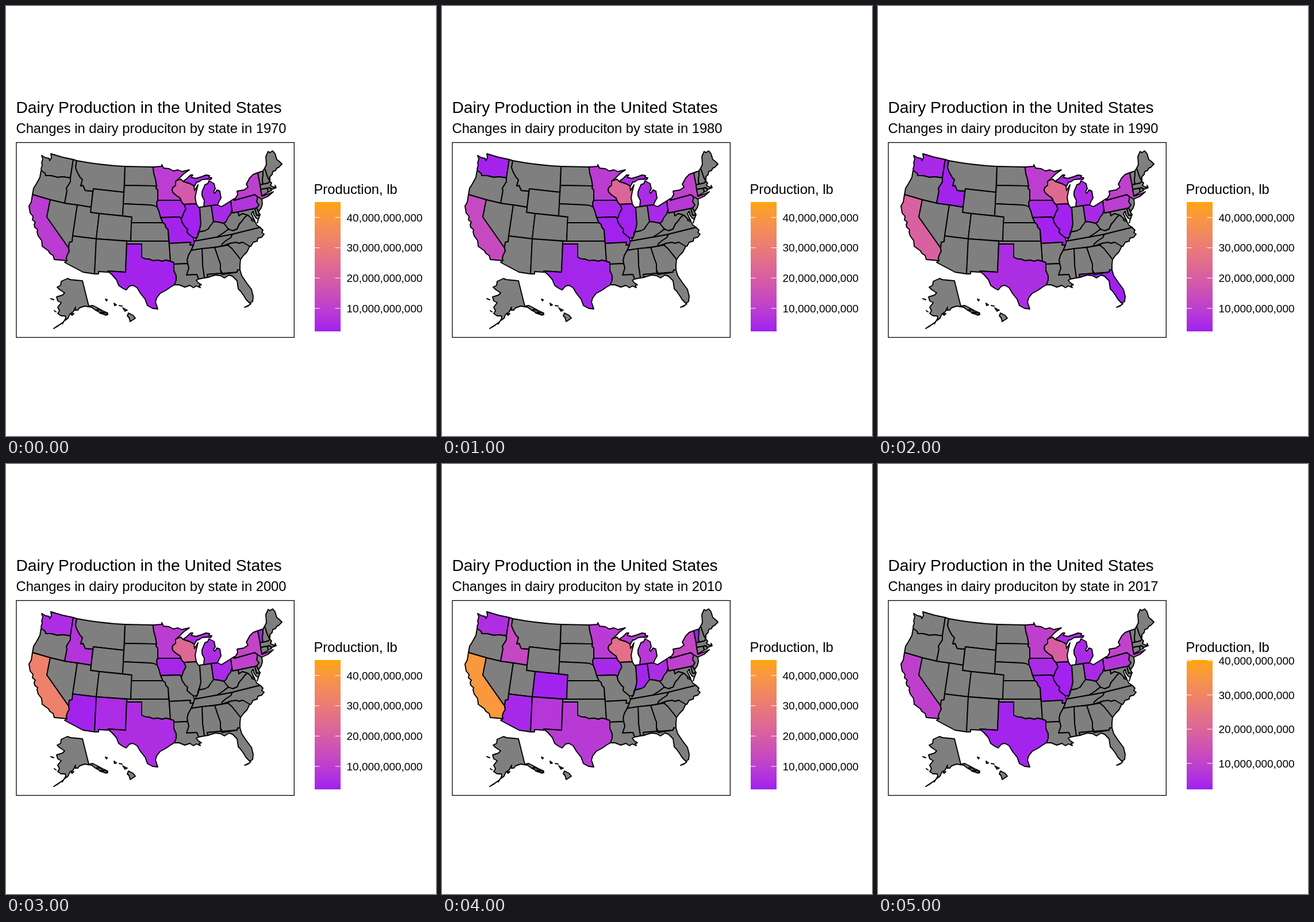
An HTML page for the animation above (6000 ms loop, 748 by 748 pixels).

```html
<!DOCTYPE html>
<html lang="en">
<head>
<meta charset="utf-8">
<title>Dairy production map</title>
<style>
  html, body { margin: 0; width: 100%; height: 100%; overflow: hidden; background: #fff; }
  svg { position: absolute; left: 0; top: 0; width: 748px; height: 748px; }
  text { font: 23.75px "Liberation Sans", Arial, sans-serif; }
  #title { font-size: 28.2px; }
  #scale text { font-size: 19px; }
  #scale path { stroke: #fff; stroke-width: 1; }
  #map path { fill: #7f7f7f; stroke: #000; stroke-width: 1.9; stroke-linejoin: round; }
  #bar {
    position: absolute; left: 536.5px; top: 341px; width: 45px; height: 225px;
    background: linear-gradient(in lab to top, #a020f0, #ffa500);
  }
</style>
</head>
<body>
<div id="bar"></div>
<svg viewBox="0 0 748 748">
  <text id="title" x="17.5" y="186">Dairy Production in the United States</text>
  <text id="subtitle" x="17.5" y="221"></text>
  <text x="535.5" y="327">Production, lb</text>
  <g id="scale"></g>
  <rect x="18" y="237.5" width="483.3" height="339" fill="none" stroke="#000" stroke-width="1.3"/>
  <g id="map">
    <path id="WA" d="M62 260L64 266 62 273 63 277 61 283 63 289 68 291 69 295 78 295 90 298 99 297 112 299 117 267 98 263 78 257 79 264 76 269 75 265 69 264Z"/>
    <path id="OR" d="M61 286L59 298 53 309 48 317 46 328 77 337 102 343 106 322 105 317 112 306 112 299 99 297 90 298 78 295 69 295 68 291Z"/>
    <path id="CA" d="M46 328L77 337 71 367 109 421 110 427 107 432 105 438 106 443 84 441 82 434 76 430 74 426 63 418 62 408 56 400 54 393 55 389 50 385 49 380 51 376 46 372 47 366 42 360 40 348 44 341Z"/>
    <path id="NV" d="M77 337L102 343 124 346 116 400 115 410 110 411 109 421 71 367Z"/>
    <path id="ID" d="M117 267L123 269 121 281 124 289 129 298 133 302 130 313 134 312 138 321 151 322 148 350 124 346 102 343 106 322 105 317 112 306 112 299Z"/>
    <path id="MT" d="M123 269Q165 277 207 279L205 324 152 318 151 322 138 321 134 312 130 313 133 302 129 298 124 289 121 281Z"/>
    <path id="WY" d="M152 318L205 324 203 365 162 361 147 359Z"/>
    <path id="UT" d="M124 346L148 350 147 359 162 361 157 405 116 400Z"/>
    <path id="CO" d="M162 361L219 367 217 409 157 405Z"/>
    <path id="AZ" d="M116 400L157 405 154 466 134 463 102 446 106 443 105 438 107 432 110 427 109 421 110 411 115 410Z"/>
    <path id="NM" d="M157 405L210 409 208 463 177 461 178 463 161 462 161 466 154 466Z"/>
    <path id="ND" d="M207 279L256 280 257 291 260 301 262 313 206 312Z"/>
    <path id="SD" d="M206 312L262 313 261 317 264 320 264 338 262 342 263 350 257 347 248 346 204 344Z"/>
    <path id="NE" d="M204 344L248 346 257 347 263 350 266 357 269 368 273 377 218 377 219 367 203 365Z"/>
    <path id="KS" d="M218 377L273 377 277 380 278 385 282 389 283 409 217 409Z"/>
    <path id="OK" d="M210 409L283 409 284 415 286 444 278 442 272 444 264 442 256 443 248 440 243 440 236 437 236 414 210 414Z"/>
    <path id="TX" d="M210 414L236 414 236 437 243 440 248 440 256 443 264 442 272 444 278 442 286 444 292 446 292 460 296 469 296 477 293 485 286 489 279 494 268 500 262 508 260 515 264 527 255 526 246 521 242 510 234 500 228 490 221 486 215 487 209 494 203 491 196 486 192 476 185 468 177 461 208 463Z"/>
    <path id="MN" d="M256 280L271 279 271 276 274 282 284 283 291 287 299 285 306 288 319 285 309 292 301 300 295 305 295 312 290 316 289 321 291 325 297 330 303 334 304 338 264 338 264 320 261 317 262 313 260 301 257 291Z"/>
    <path id="WI" d="M295 305L304 301 308 305 320 309 327 313 328 321 334 311 331 323 329 333 331 344 310 345 306 342 303 334 297 330 291 325 289 321 290 316 295 312Z"/>
    <path id="IA" d="M264 338L304 338 306 342 310 346 313 353 309 360 307 366 305 370 302 367 269 368 266 357 263 350 262 342Z"/>
    <path id="MO" d="M269 368L302 367 305 370 306 376 312 385 316 388 315 394 322 400 326 403 327 408 330 410 325 416 320 416 321 411 284 413 282 389 278 385 277 380 273 377Z"/>
    <path id="IL" d="M310 345L331 344 334 349 337 352 339 379 337 388 334 395 333 402 328 404 326 403 322 400 315 394 316 388 312 385 306 376 305 370 307 366 309 360 313 353Z"/>
    <path id="IN" d="M337 350L357 347 361 375 360 379 355 383 352 388 346 391 336 393 339 379Z"/>
    <path id="MI" d="M344 349L357 347 368 346 371 339 374 334 372 322 367 320 363 326 361 323 364 318 362 309 353 304 351 309 346 311 341 323 341 330 345 338ZM308 305L315 300 321 294 325 294 322 298 330 300 340 297 348 294 354 295 353 298 358 299 356 302 351 301 341 302 335 306 332 306 328 313 320 309Z"/>
    <path id="OH" d="M357 347L368 346 375 349 383 344 391 339 393 354 391 362 386 368 383 375 379 378 370 376 361 375Z"/>
    <path id="KY" d="M361 375L370 376 379 378 383 383 387 388 378 395 367 402 328 409 333 402 336 393 346 391 352 388 355 383Z"/>
    <path id="TN" d="M328 409L367 402 394 397 391 403 383 408 376 414 375 418 322 425 326 416Z"/>
    <path id="WV" d="M379 378L383 375 386 368 391 362 393 354 394 360 404 358 405 365 411 361 421 363 415 368 410 375 406 379 402 388 394 391 387 388 383 383Z"/>
    <path id="VA" d="M387 388L394 391 402 388 406 379 410 375 415 368 421 363 428 369 427 373 434 376 436 381 442 385 394 397 367 402 378 395ZM439 370L437 378"/>
    <path id="MD" d="M404 358L433 352 436 364 442 363 439 371 435 369 431 363 430 357 427 361 430 368 433 374 427 370 421 364 411 361 405 365Z"/>
    <path id="DE" d="M433 352L436 351 439 358 442 363 436 364Z"/>
    <path id="PA" d="M391 339L397 335 397 338 433 328 438 333 436 340 440 346 436 351 433 352 394 360 393 354Z"/>
    <path id="NJ" d="M438 332L445 335 446 344 444 351 440 357 436 352 440 346 436 340Z"/>
    <path id="NY" d="M397 338L403 328 402 322 414 320 421 315 418 310 424 299 430 293 438 290 440 301 442 311 443 319 445 331 456 327 465 323 456 331 445 336 438 332 433 328Z"/>
    <path id="VT" d="M438 290L447 287 447 294 446 303 447 310 442 311 440 301Z"/>
    <path id="NH" d="M447 287L450 282 455 297 459 305 456 308 447 310 446 303 447 294Z"/>
    <path id="ME" d="M450 282L453 276 452 262 456 253 459 255 464 252 468 257 471 267 475 270 480 275 474 281 471 282 469 286 464 288 463 293 459 297 459 305 455 297Z"/>
    <path id="MA" d="M442 311L456 308 459 305 462 308 460 312 465 315 469 315 468 312 470 316 462 319 459 316 443 319Z"/>
    <path id="CT" d="M443 319L455 317 456 324 445 330Z"/>
    <path id="RI" d="M455 317L459 316 462 321 456 324Z"/>
    <path id="NC" d="M394 397L442 385 447 390 445 394 449 397 445 402 438 404 437 409 430 411 426 418 421 418 412 411 404 413 401 411 389 413 375 418 376 414 383 408 391 403Z"/>
    <path id="SC" d="M386 416L389 413 401 411 404 413 412 411 424 418 419 428 413 434 408 441 401 432 393 422Z"/>
    <path id="GA" d="M363 420L386 416 393 422 401 432 408 441 407 450 407 459 403 459 402 463 376 465 373 459 373 449 370 441Z"/>
    <path id="AL" d="M341 422L363 420 370 441 373 449 373 459 374 465 350 467 352 472 345 473 342 452Z"/>
    <path id="MS" d="M322 425L341 422 342 452 345 473 335 475 332 467 314 468 318 456 316 448 315 442 317 434Z"/>
    <path id="AR" d="M284 413L321 411 320 416 326 416 322 425 317 434 315 442 316 448 292 449 292 446 286 444Z"/>
    <path id="LA" d="M292 449L316 448 318 456 314 468 332 467 335 475 331 477 334 481 340 485 336 486 338 490 331 487 326 490 320 486 311 489 301 485 293 485 296 477 296 469 292 460Z"/>
    <path id="FL" d="M350 467L374 465 376 467 402 463 403 459 407 459 410 469 418 481 427 493 430 505 429 514 424 517 418 511 413 503 408 496 404 492 402 478 394 470 388 468 380 473 373 469 364 468 351 472ZM426 518L421 522 415 524 423 520Z"/>
    <path id="AK" d="M96 479L107 474 112 476 133 478 144 522 151 521 157 524 168 530 177 534 174 538 166 534 157 530 149 524 137 522 128 525 125 529 120 529 121 524 117 532 111 536 108 543 100 549 98 553 104 543 103 539 96 539 90 535 93 530 90 524 96 516 90 513 88 506 98 503 102 499 93 493 89 489 95 486ZM98 551L90 557 83 561 92 555ZM78 509L83 511ZM84 530L87 532ZM118 535L115 538 113 536ZM158 528L165 529 169 536 163 534ZM169 533L176 534 177 537 171 537Z"/>
    <path id="HI" d="M173 510L176 511 175 513ZM188 517L192 520 189 521ZM197 521L202 522ZM204 526L211 529 207 531ZM203 525L205 526ZM213 534L221 538 225 543 216 549 214 542 211 539Z"/>
  </g>
</svg>
<script>
const LOW = 2.4, BAR_BOTTOM = 566, BAR_HEIGHT = 225;
const YEAR_MS = 1000;

// Production in billions of pounds
const first = { CA: 9.5, MN: 9.6, WI: 18.4, NY: 10.3, PA: 7.1, IA: 4.6, IL: 2.8, MO: 3, MI: 4.6, OH: 4.4, TX: 3.1 };
const years = [
  { year: 1970, top: 45.1, lbs: first },
  { year: 1980, top: 45.1, lbs: { CA: 13.6, MN: 9.5, WI: 22.4, NY: 11, PA: 8.5, IA: 4, IL: 2.6, MO: 2.8, MI: 5, OH: 4.3, TX: 3.6, WA: 3 } },
  { year: 1990, top: 45.1, lbs: { CA: 20.9, MN: 10, WI: 24.2, NY: 11.1, PA: 10, IA: 4.2, IL: 2.8, MO: 3, MI: 5.2, OH: 4.7, TX: 5.5, WA: 4.4, ID: 2.9, FL: 2.5 } },
  { year: 2000, top: 45.1, lbs: { CA: 32.2, MN: 9.5, WI: 23.3, NY: 11.9, PA: 11.2, IA: 3.9, MI: 5.7, OH: 4.5, TX: 5.7, WA: 5.6, ID: 7.2, NM: 5.2, AZ: 3, VT: 2.7 } },
  { year: 2010, top: 45.1, lbs: { CA: 40.4, MN: 9.1, WI: 26, NY: 12.7, PA: 10.7, IA: 4.3, MI: 8.3, OH: 5.3, TX: 8.8, WA: 5.9, ID: 12.8, NM: 7.9, AZ: 4.2, IN: 3.4, CO: 2.8, VT: 2.5 } },
  { year: 2017, top: 40.2, lbs: first }
];

const byId = id => document.getElementById(id);
const fraction = (value, top) => (value - LOW) / (top - LOW);
const shade = t => `color-mix(in lab, #ffa500 ${100 * t}%, #a020f0)`;

function scaleMark(value, top) {
  const y = BAR_BOTTOM - fraction(value, top) * BAR_HEIGHT;
  return `<path d="M536.5 ${y}h9m27 0h9"/><text x="592.5" y="${y + 6.8}">${value},000,000,000</text>`;
}

function show({ year, top, lbs }) {
  byId("subtitle").textContent = `Changes in dairy produciton by state in ${year}`;
  byId("scale").innerHTML = [10, 20, 30, 40].map(v => scaleMark(v, top)).join("");
  for (const state of byId("map").children) {
    const value = lbs[state.id];
    state.style.fill = value ? shade(fraction(value, top)) : "";
  }
}

let shown = -1;
function tick() {
  const index = Math.floor(performance.now() / YEAR_MS) % years.length;
  if (index !== shown) show(years[shown = index]);
  requestAnimationFrame(tick);
}
tick();
</script>
</body>
</html>
```
